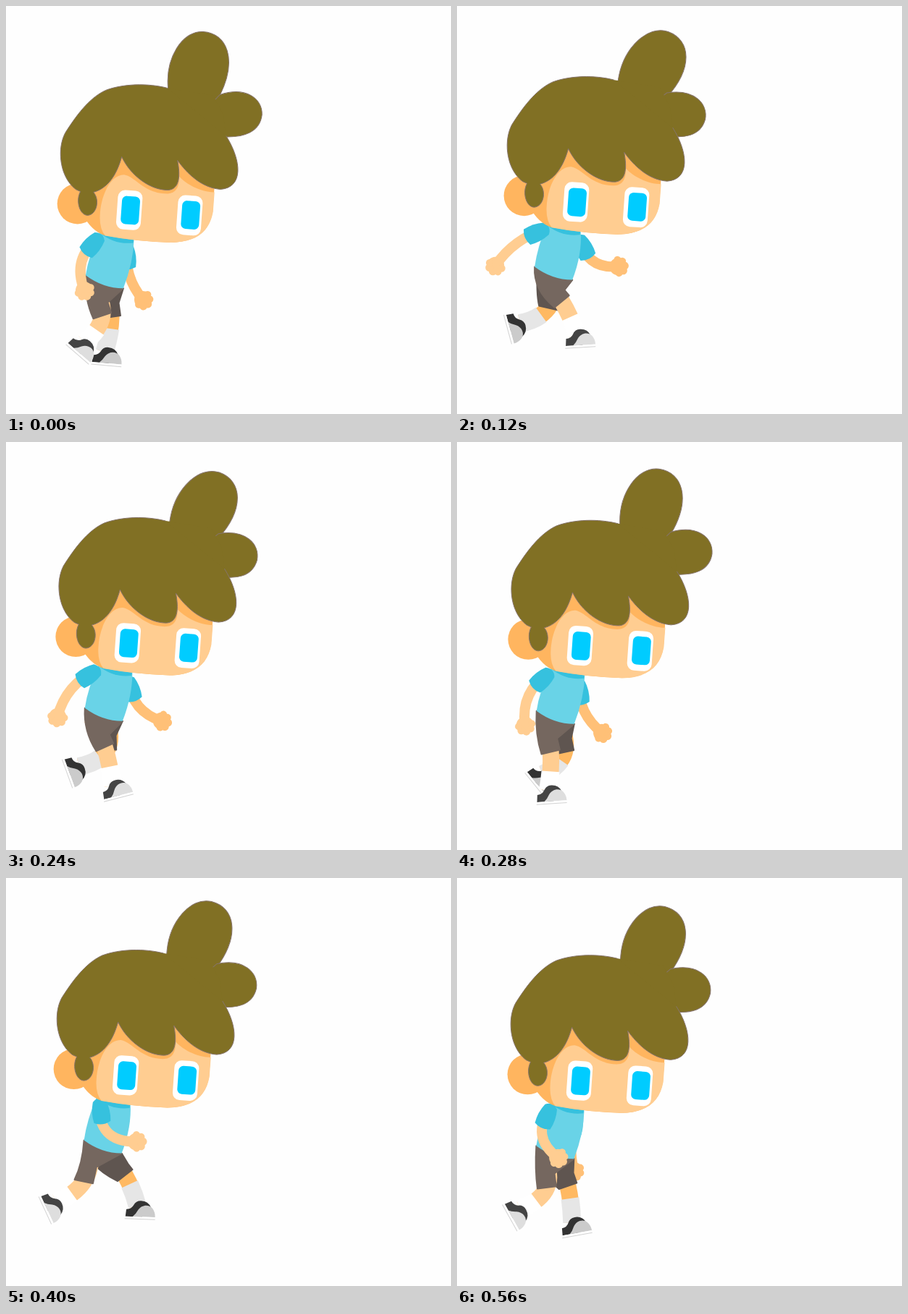
An HTML page that plays this animation: 614 px wide and 564 px high, repeating every 0.6 s.

```html
<!DOCTYPE html>
<html lang="en">
<head>
<meta charset="utf-8">
<title>Running boy</title>
<style>
html, body { margin: 0; width: 100%; height: 100%; overflow: hidden; background: #fefefe; }
svg { display: block; width: 614px; height: 564px; }
.hair { fill: #817024; stroke: #86746c; stroke-width: 1; }
.limb { fill: none; }
</style>
</head>
<body>
<svg viewBox="0 0 614 564" xmlns="http://www.w3.org/2000/svg">
  <defs>
    <g id="hand">
      <circle r="12"/>
      <circle cx="-3" cy="-9" r="5"/><circle cx="4" cy="-8.500" r="5"/>
      <circle cx="8.500" cy="-3" r="5.500"/><circle cx="8" cy="4" r="5.500"/><circle cx="3" cy="8.500" r="5"/>
    </g>
    <path id="sleeve" fill="#36c1de" d="M-9-2Q0-10 9-2Q14 12 11.500 27Q0 33-11.500 27Q-14 12-9-2Z"/>
    <g id="shoe">
      <path d="M-19 17L-18 7Q-11 7-8 1Q-5-5 2-5Q12-5 16 4L4 17Z"/>
      <path class="cap" d="M-9 17Q-5 14-2 8C3 0 13-1 18 5Q22 10 22 17Z"/>
      <rect x="-20" y="17" width="42" height="3.500" rx="1" fill="#fff"/>
      <path d="M-20 20.200H22" stroke="#d2d2d2" stroke-width="1"/>
    </g>
  </defs>
  <g id="farArm"></g>
  <g id="farLeg"></g>
  <g id="nearLeg"></g>
  <path id="shirt" fill="#69d3e7"/>
  <path id="collar" fill="#36c1de"/>
  <g id="nearArm"></g>
  <g id="head">
    <circle cx="99" cy="274" r="28" fill="#ffb55f"/>
    <path fill="#ffb55f" d="M112 200L107 290Q118 311 136 317.500Q180 326 228 327.500C262 327 281 312 285.500 285L288 250L290 220L160 190Z"/>
    <path fill="#ffcd91" d="M130 290C131 262 145 233 164 234C180 237 192 261 224 260C236 259 240 249 239 236C250 248 270 258 288 258L286 285C281 312 264 327 228 327.500Q180 326 137 318Q129 308 130 290Z"/>
    <path id="tuftA" class="hair" d="M228 150L223 114C218 75 238 35 268 35C302 36 317 72 295 122L282 150Z"/>
    <path id="tuftB" class="hair" d="M270 150L295 122C330 109 354 125 354 148C352 172 330 180 304 180Z"/>
    <path fill="#817024" d="M223 114L286 124L300 150L304 181L230 190Z"/>
    <path class="hair" d="M223 114C196 107 162 108 138 117C114 128 96 154 82 176C71 197 74 232 92 250Q96 255 103 257C96 270 102 290 113 290C126 289 130 268 121 258C140 253 153 235 160 209C172 235 200 256 225 255C240 253 241 235 237 214C250 232 270 252 296 254C328 252 326 215 304 180"/>
    <g transform="rotate(4 170.500 282.500)">
      <rect x="153.500" y="255.500" width="34" height="54.500" rx="10" fill="#fff"/>
      <rect x="159.500" y="263.500" width="25" height="39" rx="6.500" fill="#0cf"/>
    </g>
    <g transform="rotate(4 253.500 290)">
      <rect x="236.500" y="262.500" width="34" height="55" rx="10" fill="#fff"/>
      <rect x="242.500" y="270" width="25" height="39" rx="6.500" fill="#0cf"/>
    </g>
  </g>
</svg>
<script>
const STEP = 40, COUNT = 15;
const { sin, cos, PI } = Math;
const RAD = PI / 180;
const $ = id => document.getElementById(id);
const put = (el, attrs) => { for (const k in attrs) el.setAttribute(k, attrs[k]); };
const place = (x, y, a) => `translate(${x} ${y}) rotate(${a})`;
const degrees = (x, y) => Math.atan2(y, x) / RAD;

// swing once per stride (s, c) plus a beat on each footfall (c2)
const wave = (p, mean, s, c, c2) => mean + s * sin(p) + c * cos(p) + c2 * cos(2 * p);

// quadratic curve from a to b that passes m halfway
function bend(a, m, b) {
  const c = [0, 1].map(i => 2 * m[i] - (a[i] + b[i]) / 2);
  return { c, d: `M${a}Q${c} ${b}` };
}

function buildArm(id, skin) {
  $(id).innerHTML = `<path class="limb" stroke="${skin}" stroke-width="14"/>
    <use href="#hand" fill="${skin}"/><use href="#sleeve"/>`;
}

function buildLeg(id, skin, sock, sockPart, shorts, dark, cap) {
  $(id).innerHTML = `<path class="limb" stroke="${skin}" stroke-width="23"/>
    <path class="limb" stroke="${sock}" stroke-width="25" pathLength="100"
      stroke-dasharray="0 ${100 - sockPart} ${sockPart}"/>
    <g fill="${dark}">${$('shoe').innerHTML}</g>
    <path fill="${shorts}" stroke="${shorts}" stroke-width="2" stroke-linejoin="round"/>`;
  $(id).querySelector('.cap').setAttribute('fill', cap);
}

function drawArm(id, s, h, bow) {
  const [arm, hand, sleeve] = $(id).children;
  const dx = h[0] - s[0], dy = h[1] - s[1], len = Math.hypot(dx, dy);
  const m = [(s[0] + h[0]) / 2 - dy / len * bow, (s[1] + h[1]) / 2 + dx / len * bow];
  const { c, d } = bend(s, m, h);
  const u = 0.35, v = 1 - u;
  const [px, py] = [0, 1].map(i => v * v * s[i] + 2 * u * v * c[i] + u * u * h[i]);
  put(arm, { d });
  put(hand, { transform: place(h[0], h[1], degrees(h[0] - m[0], h[1] - m[1])) });
  put(sleeve, { transform: place(s[0], s[1], degrees(px - s[0], py - s[1]) - 90) });
}

function drawLeg(id, p, hip, shift, w0, w1) {
  const [shin, sock, shoe, shorts] = $(id).children;
  const thigh = wave(p, 13, 26, 5, 0) * RAD;
  const turn = wave(p, 30, -47, 18, -7);
  const ax = wave(p, 116, 54, -3, -2) + shift[0];
  const ay = wave(p, 457, 6.5, -7, 13.7) + shift[1];

  const nx = sin(thigh), ny = cos(thigh);
  const at = (along, side) =>
    [hip[0] + nx * along + ny * side, hip[1] + ny * along - nx * side];
  const r = turn * RAD;
  const end = [ax - 3 * cos(r) - 2 * sin(r), ay - 3 * sin(r) + 2 * cos(r)];
  const { d } = bend(hip, at(45, 0), end);
  put(shin, { d });
  put(sock, { d });
  put(shoe, { transform: place(ax, ay, turn) });
  put(shorts, {
    d: `M${w0}Q${[w0[0] - 2, w0[1] + 32]} ${at(45, -13)}` +
       `L${at(45, 13)}L${at(25 + 16 * nx, 13)}L${w1}Z`
  });
}

function draw(frame) {
  const p = frame / COUNT * 2 * PI, q = p + PI;
  const dy = wave(p, -6.8, 0, 0, 6.2), dx = dy * 0.54;
  const swing = 14 * (1 - cos(2 * p - 35 * RAD));
  const top = (x, y) => [x + dx, y + dy];
  const hem = (x, y) => [x + dx * 0.45, y + dy * 1.05];
  const w0 = hem(110, 373), w1 = hem(162, 391);

  put($('head'), { transform: `translate(${dx} ${dy})` });
  put($('tuftA'), { transform: `rotate(${swing} 245 132)` });
  put($('tuftB'), { transform: `rotate(${swing * 0.6} 245 132)` });
  put($('shirt'), {
    d: `M${top(130, 314)}Q${hem(114, 345)} ${w0}Q${hem(134, 391)} ${w1}` +
       `Q${hem(176, 355)} ${top(177, 322)}Z`
  });
  put($('collar'), { d: `M${top(130, 314)}Q${top(150, 331)} ${top(176, 328)}L${top(177, 318)}Z` });

  drawArm('nearArm', hem(128 - 4 * sin(p), 321),
    [wave(p, 115, -71, 0, -7), wave(p, 374, 0, 0, 19)], 14 - 7 * sin(p));
  drawArm('farArm', hem(167 + 5 * sin(p), 335),
    [wave(p, 177, 58, 0, 12), wave(p, 387, -12, 0, 19)], 8 + 6 * sin(p));
  drawLeg('nearLeg', p, hem(119, 386), [0, 2], w0, w1);
  drawLeg('farLeg', q, hem(139, 386), [22, -1], hem(114, 376), w1);
}

buildArm('farArm', '#ffc077');
buildArm('nearArm', '#ffcd91');
buildLeg('farLeg', '#ffb962', '#e6e6e6', 35, '#5f5550', '#333', '#cbcbcb');
buildLeg('nearLeg', '#ffcd91', '#fff', 27, '#75675f', '#444', '#dedede');

function tick() {
  draw(Math.floor(performance.now() / STEP) % COUNT);
  requestAnimationFrame(tick);
}
tick();
</script>
</body>
</html>
```
